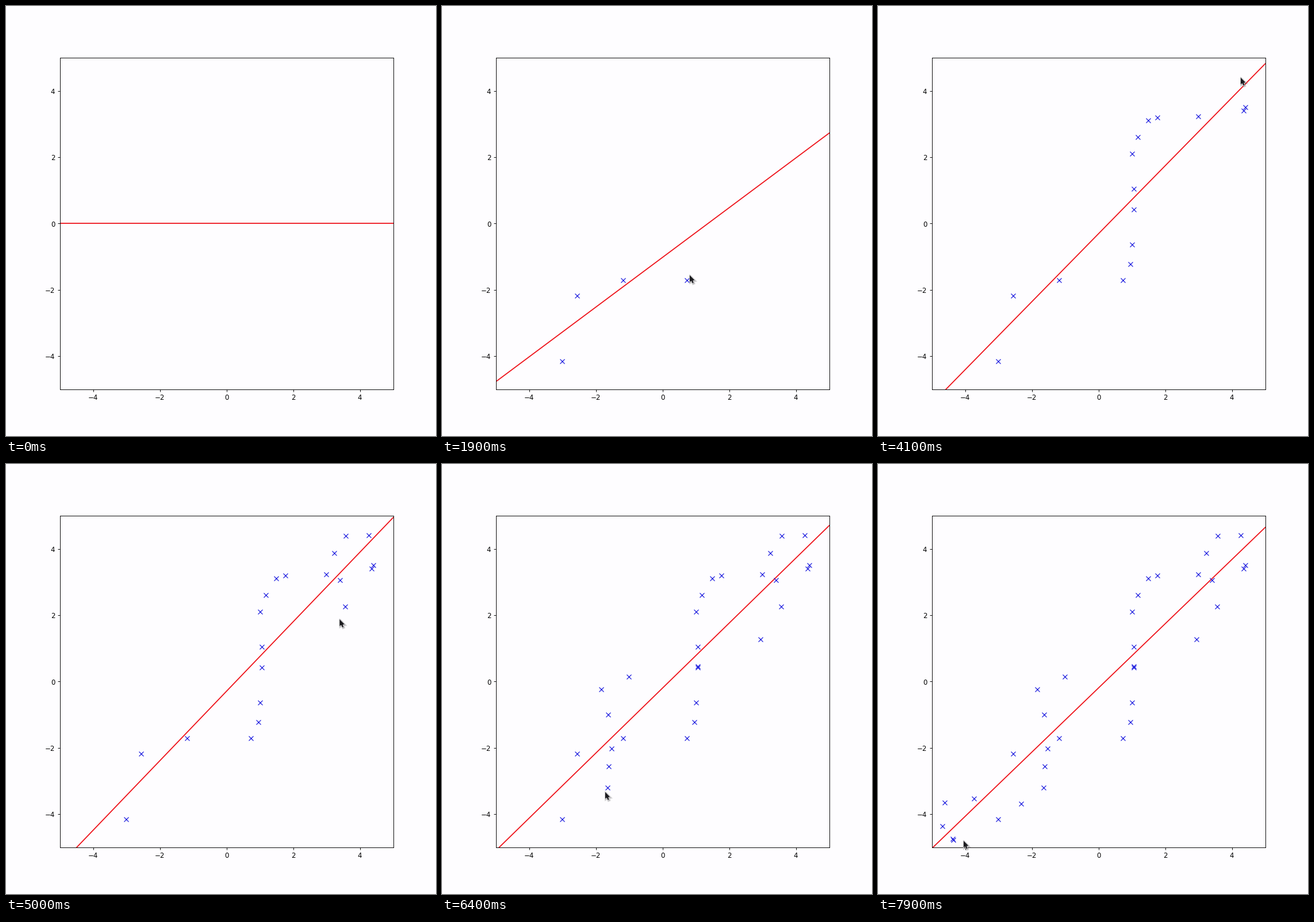
These frames come from a looping animation (748x748 px, 8000 ms). A matplotlib script:

```python
import numpy as np
import matplotlib.pyplot as plt
from matplotlib.animation import FuncAnimation
from matplotlib.patches import Polygon
from matplotlib.transforms import IdentityTransform

SIZE, DPI = 748, 85
FRAMES, STEP_MS = 80, 100
LEFT, TOP, WIDTH, HEIGHT = 93.5, 90.5, 580, 576
RATE = 0.22
BG = "#fefdff"

# Mouse clicks: frame, x and y in pixels from the top left
CLICKS = np.array([
    (9, 208, 618), (12, 234, 504), (14, 314, 477), (18, 425, 477),
    (21, 438, 449), (22, 441, 415), (24, 444, 354), (25, 444, 318),
    (27, 441, 257), (30, 451, 228), (31, 469, 199), (32, 485, 194),
    (34, 556, 192), (37, 635, 182), (38, 638, 176), (42, 630, 124),
    (44, 590, 125), (45, 570, 155), (47, 580, 202), (49, 589, 248),
    (51, 553, 305), (54, 444, 352), (57, 324, 370), (59, 276, 392),
    (60, 288, 436), (62, 294, 495), (63, 289, 525), (64, 287, 562),
    (67, 248, 590), (70, 166, 582), (72, 115, 588), (74, 111, 629),
    (76, 129, 651), (77, 130, 653)], float)
# Pointer places between clicks
RESTS = [(3, 262, 742), (19, 430, 467), (41, 630, 123), (50, 580, 268),
         (64.01, 283, 569), (79, 148, 654)]

path = np.vstack([CLICKS, RESTS])
path = path[np.argsort(path[:, 0])]
px = (CLICKS[:, 1] + 0.5 - LEFT) / WIDTH * 10 - 5
py = 5 - (CLICKS[:, 2] + 0.5 - TOP) / HEIGHT * 10


def descend(w, x, y):
    """One frame of gradient flow on the squared error."""
    A = np.column_stack([x, np.ones_like(x)])
    lam, V = np.linalg.eigh(A.T @ A)
    lam = np.maximum(lam, 1e-9)
    gain = -np.expm1(-RATE * lam) / lam
    return w + V @ (gain * (V.T @ (A.T @ (y - A @ w))))


fits = []
w = np.zeros(2)
for i in range(FRAMES):
    n = np.sum(CLICKS[:, 0] <= i)
    if n:
        w = descend(w, px[:n], py[:n])
    fits.append(w)

fig = plt.figure(figsize=(SIZE / DPI, SIZE / DPI), dpi=DPI, facecolor=BG)
ax = fig.add_axes([LEFT / SIZE, 1 - (TOP + HEIGHT) / SIZE,
                   WIDTH / SIZE, HEIGHT / SIZE], facecolor=BG)
ax.set(xlim=(-5, 5), ylim=(-5, 5),
       xticks=range(-4, 5, 2), yticks=range(-4, 5, 2))

ends = np.array([-5, 5])
line, = ax.plot(ends, ends * 0, color="#ee1018", lw=1.5)
marks, = ax.plot([], [], "x", color="#1414dd", ms=6, mew=1)

ARROW = np.array([(0, 0), (0, 13.5), (3, 11.3), (5, 15.5),
                  (7.6, 14.4), (6.2, 10.4), (9.8, 10)])
shadow = Polygon(ARROW, fc="#000000", ec="#000000", alpha=0.16, lw=2.2)
arrow = Polygon(ARROW, fc="#1c1c20", ec="#d8d7d9", lw=0.7)
for z, patch in enumerate((shadow, arrow)):
    patch.set(transform=IdentityTransform(), zorder=10 + z)
    fig.add_artist(patch)


def place(patch, x, y):
    patch.set_xy(np.column_stack([ARROW[:, 0] + x, SIZE - y - ARROW[:, 1]]))


def draw(i):
    slope, offset = fits[i]
    line.set_ydata(slope * ends + offset)
    n = np.sum(CLICKS[:, 0] <= i)
    marks.set_data(px[:n], py[:n])
    x, y = (np.interp(i + 0.02, path[:, 0], path[:, k]) + 0.5 for k in (1, 2))
    place(arrow, x, y)
    place(shadow, x + 1, y + 1.2)
    for patch in (arrow, shadow):
        patch.set_visible(i >= 3)
    return line, marks, shadow, arrow


anim = FuncAnimation(fig, draw, frames=FRAMES, interval=STEP_MS,
                     init_func=lambda: draw(0), repeat=True, repeat_delay=0)
plt.show()
```
